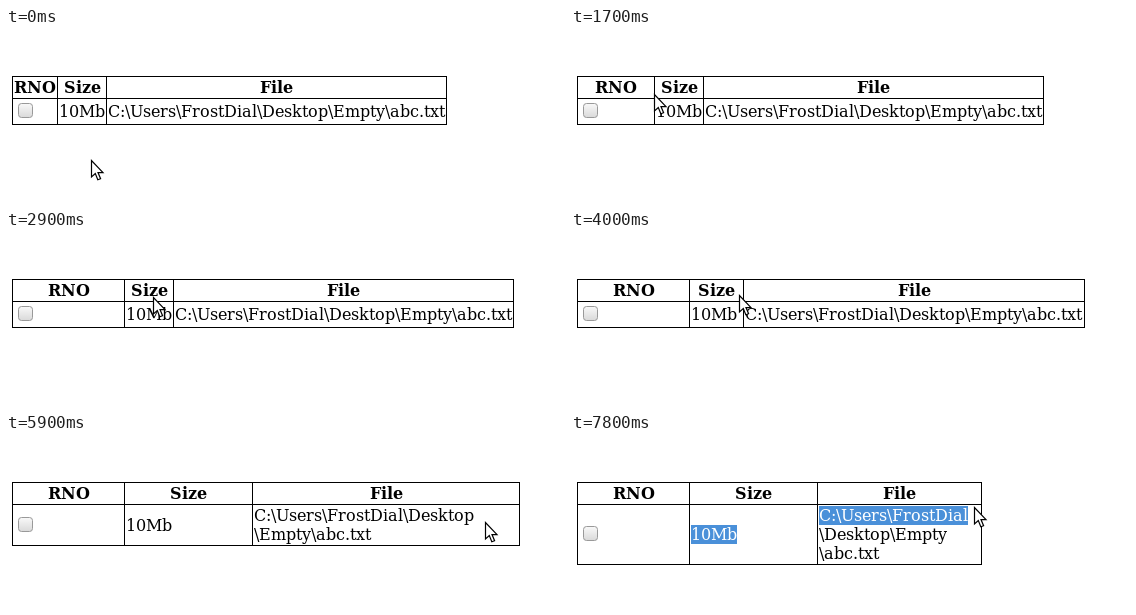
Recreate the animation shown at these times as an HTML page with a canvas. Size 559 by 175 pixels, loop 8000 ms.

```html
<!DOCTYPE html>
<html lang="en">
<head>
<meta charset="utf-8">
<title>Resizable table columns</title>
<style>
  html, body { margin: 0; width: 100%; height: 100%; overflow: hidden; background: #fff; }
  canvas { display: block; }
</style>
</head>
<body>
<canvas id="stage" width="559" height="175"></canvas>
<script>
const ctx = document.getElementById('stage').getContext('2d');
const LOOP = 8000, STEP = 100;
const LEFT = 6, TOP = 48, BODY = 71, LINE = 19, ASCENT = 15;
const SIZE_WIDTH = 49, FILE_WIDTH = 340;
const REGULAR = '16px "DejaVu Serif", serif';
const BOLD = 'bold ' + REGULAR;
const PATH = 'C:\\Users\\FrostDial\\Desktop\\Empty\\abc.txt';

// Button held down on a column edge
const drags = [{ from: 1600, to: 2600 }, { from: 4000, to: 5700 }, { from: 7100, to: LOOP }];

// Pointer travel; it rests between moves
const home = { x: 85, y: 132 };
const moves = [
  { from: 200, to: 1100, x: 51, y: 66 },
  { from: 1500, to: 2100, x: 118, y: 67 },
  { from: 2500, to: 3400, x: 165, y: 66 },
  { from: 3900, to: 4000, x: 168, y: 64 },
  { from: 4000, to: 4700, x: 238, y: 67 },
  { from: 5600, to: 5900, x: 479, y: 88 },
  { from: 6100, to: 6600, x: 509, y: 73 },
  { from: 7100, to: 7800, x: 403, y: 73 }
];

const ARROW = [[.5, .5], [.5, 17], [4.3, 13.6], [6.8, 19.8], [9.6, 18.7], [7, 12.6], [12, 12.6]];
const mirror = (points, sx, sy) => [...points, ...points.map(([x, y]) => [x * sx, y * sy]).reverse()];
const RESIZE = mirror(mirror([[10.5, 0], [5, 5.5], [5, 1.5], [1.5, 1.5], [1.5, 8]], -1, 1), 1, -1);

// Decelerating progress from 0 to 1
function progress(t, from, to) {
  const u = Math.min(1, Math.max(0, (t - from) / (to - from)));
  return 1 - (1 - u) ** 1.6;
}

const mix = (a, b, u) => Math.round(a + (b - a) * u);

function pointerAt(t) {
  return moves.reduce((p, move) => {
    const u = progress(t, move.from, move.to);
    return { x: mix(p.x, move.x, u), y: mix(p.y, move.y, u) };
  }, home);
}

function edgesAt(t) {
  const a = mix(51, 118, progress(t, 1500, 2100));
  if (t < 4000) return [a, a + SIZE_WIDTH, a + SIZE_WIDTH + FILE_WIDTH];
  const b = mix(172, 246, progress(t, 4000, 4700));
  const c = t < 7100 ? 513 : mix(516, 410, progress(t, 7100, 7800));
  return [a, b, c];
}

// Glyph advances snap to whole pixels, as in hinted browser text.
const advance = ch => Math.round(ctx.measureText(ch).width);
const textWidth = text => [...text].reduce((sum, ch) => sum + advance(ch), 0);

function drawText(text, x, baseline, color = '#000') {
  ctx.fillStyle = color;
  for (const ch of text) {
    ctx.fillText(ch, x, baseline);
    x += advance(ch);
  }
}

function drawLine(text, x, top, selected) {
  if (selected) {
    ctx.fillStyle = '#4a90d9';
    ctx.fillRect(x, top, textWidth(text), LINE);
  }
  drawText(text, x, top + ASCENT, selected ? '#fff' : '#000');
}

function drawHeading(text, left, right) {
  drawText(text, Math.ceil((left + 1 + right - textWidth(text)) / 2), TOP + 2 + ASCENT);
}

function wrapPath(room) {
  const lines = [''];
  for (const part of PATH.split(/(?=\\)/)) {
    const last = lines.length - 1;
    if (!lines[last] || textWidth(lines[last] + part) <= room) lines[last] += part;
    else lines.push(part);
  }
  return lines;
}

function drawCheckbox(x, y) {
  const shade = ctx.createLinearGradient(0, y, 0, y + 15);
  shade.addColorStop(0, '#fafafa');
  shade.addColorStop(1, '#d8d8d8');
  ctx.beginPath();
  ctx.roundRect(x + .5, y + .5, 14, 14, 3);
  ctx.fillStyle = shade;
  ctx.fill();
  ctx.strokeStyle = '#999';
  ctx.lineWidth = 1;
  ctx.stroke();
}

function drawPointer(t, edges) {
  const { x, y } = pointerAt(t);
  const dragging = drags.some(drag => t >= drag.from && t < drag.to);
  const onEdge = y < 80 && edges.some(edge => Math.abs(x - edge) < 7);
  ctx.save();
  ctx.translate(x, y);
  ctx.beginPath();
  for (const [px, py] of onEdge && !dragging ? RESIZE : ARROW) ctx.lineTo(px, py);
  ctx.closePath();
  ctx.fillStyle = '#fff';
  ctx.fill();
  ctx.strokeStyle = '#000';
  ctx.lineWidth = 1.2;
  ctx.stroke();
  ctx.restore();
}

function draw(t) {
  const edges = edgesAt(t);
  const [a, b, c] = edges;
  const selected = t >= 7200;

  ctx.fillStyle = '#fff';
  ctx.fillRect(0, 0, 559, 175);

  ctx.font = BOLD;
  drawHeading('RNO', LEFT, a);
  drawHeading('Size', a, b);
  drawHeading('File', b, c);

  ctx.font = REGULAR;
  const lines = wrapPath(c - b - 3);
  const height = Math.max(25, lines.length * LINE + 2);
  const middle = content => BODY + Math.ceil((height - content) / 2);
  drawLine('10Mb', a + 2, middle(LINE), selected);
  const top = middle(lines.length * LINE);
  lines.forEach((line, i) => drawLine(line, b + 2, top + i * LINE, selected && i === 0));
  drawCheckbox(12, middle(17));

  const bottom = BODY + height;
  ctx.fillStyle = '#000';
  for (const y of [TOP, BODY - 1, bottom]) ctx.fillRect(LEFT, y, c - LEFT + 1, 1);
  for (const x of [LEFT, ...edges]) ctx.fillRect(x, TOP, 1, bottom - TOP + 1);

  drawPointer(t, edges);
}

const start = performance.now();
function tick() {
  const t = (performance.now() - start) % LOOP;
  draw(Math.floor(t / STEP) * STEP);
  requestAnimationFrame(tick);
}
tick();
</script>
</body>
</html>
```
